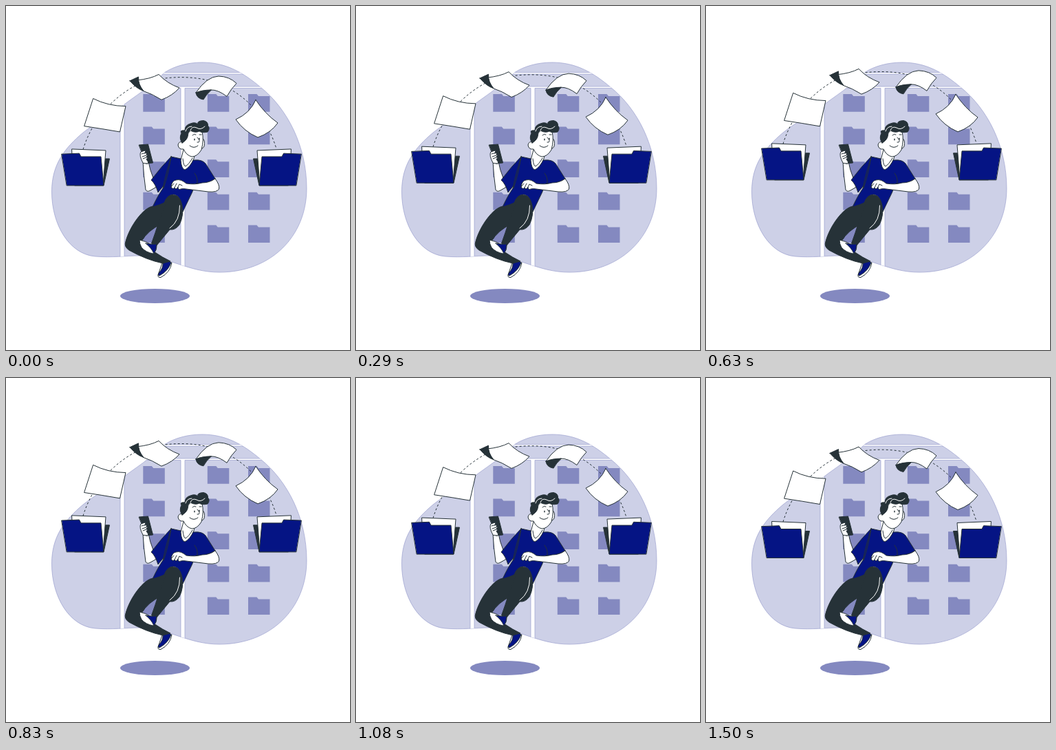
Write an HTML page that moves like this. It is 500 by 500 pixels and loops after 1540 ms.

```html
<!DOCTYPE html>
<html lang="en">
<head>
<meta charset="utf-8">
<title>File transfer</title>
<style>
  html, body { margin: 0; height: 100%; overflow: hidden; background: #fff; }
  svg { display: block; width: 100vw; height: 100vh; }
  .ink { stroke: #263238; stroke-width: 1; stroke-linejoin: round; stroke-linecap: round; }
  .blue { fill: #051484; }
  .dark { fill: #263238; }
  .white { fill: #fff; }
  .line { fill: none; }
  .shine { fill: none; stroke: #fff; stroke-width: 1; stroke-linecap: round; }
  .mid { fill: #8489c0; }
  .edge { stroke: #9da1cf; stroke-width: .7; }
</style>
</head>
<body>
<svg viewBox="0 0 500 500">
  <defs>
    <path id="blob" d="M285 82C320 82 345 97 370 118C410 150 437 205 437 265C437 335 385 387 310 387C265 387 237 364 195 363C172 363 155 366 130 364C92 361 66.500 318 66.500 270C66.500 230 85 207 112 184C132 168 155 157 172 143C186 132 208 119 230 97C245 87 265 82 285 82Z"/>
    <clipPath id="inside"><use href="#blob"/></clipPath>
    <path id="icon" d="M0 0H12.500L15 3H31.500V25.700H0Z"/>
    <g id="folder" class="ink">
      <path class="dark" d="M138 222.500H150.500L142 261.500H100Z"/>
      <path class="white" d="M96 208.500L145 210.500L141.500 256H98Z"/>
      <path class="blue" d="M81 215.700L106.500 214.700L109 219.500H138L142 261.500H88.500Z"/>
    </g>
  </defs>

  <!-- cabinet -->
  <use href="#blob" class="edge" fill="#cdd0e7"/>
  <g class="white edge" clip-path="url(#inside)">
    <path d="M166 130H172V380H166ZM200 96.500H360V99H200ZM180 117H390V119.500H260V400H254V119.500H180Z"/>
  </g>
  <g id="icons" class="mid"></g>
  <ellipse class="mid" cx="216.500" cy="421.500" rx="50.500" ry="10.500"/>

  <!-- flying files -->
  <g id="files">
    <path class="ink line" stroke-dasharray="3 3" style="stroke-linecap:butt" d="M112 209C124 170 150 138 185 118C215 103 270 99 305 112C350 128 380 165 393 208"/>
    <use href="#folder"/>
    <use href="#folder" transform="matrix(-1 0 0 1 510 0)"/>
    <g class="ink white">
      <path d="M127 135.200Q148 146 174 146.200L165.500 183.500Q140 179 114 175.200Z"/>
      <path d="M190 108.500Q210 106.500 222 100Q234 113 252 119.500Q242 131 226 136.800Q212 128 199.500 124Z"/>
      <path class="dark" d="M180 109.300L192.500 103.500Q192 115 200 124Q190 121 180 109.300Z"/>
      <path d="M276 126.500Q292 103 309 102.500Q325 103 335 113Q327 121 321 132Q308 122 298 122.500Z"/>
      <path class="dark" d="M276 126.500Q285 122.500 298.500 122.500Q291 129 287 136.500Q277 135 276 126.500Z"/>
      <path d="M363 137Q376 157 395 170.500Q385 185 366 191.500Q346 183 334 165.500Q355 156 363 137Z"/>
    </g>
  </g>

  <!-- person -->
  <g class="ink">
    <!-- supporting leg -->
    <path class="white" d="M228 372L241 373Q239 387 225 394.500Q220 395 221 391Z"/>
    <path class="blue" d="M228 372Q235 369 240 373Q236 385 223 392Q220 392 222 388Q229 381 228 372Z"/>
    <path class="dark" d="M214 291C200 292 180 320 174 342Q171 350 179 355Q204 369 228 374L239 371Q216 360 197 342Q206 326 226 317Q246 303 254 286Q250 271 236 276Q226 288 214 291Z"/>
    <!-- crossed leg -->
    <path class="dark" d="M236 277Q252 271 256 287Q259 304 252 318Q246 326 238 325Q228 337 219 348L211.500 345Q217 330 222 314Z"/>
    <path class="white" d="M194 340Q204 342 209 346L219 347Q219 356 214 360Q203 358 197 351Q194 346 194 340Z"/>
    <path class="blue" d="M203 345Q212 347 219 346Q219 355 215 360Q211 351 203 345Z"/>
    <path class="shine" d="M252.500 290Q253 312 238 323"/>

    <!-- raised arm -->
    <path class="white" d="M199 226Q200 246 203 267Q205 271 210 268L222 261L214 250Q209 238 207 226Z"/>
    <path class="dark" d="M193.500 202L206.500 201L213.500 228L204 229Z"/>
    <path class="white" d="M199 228Q193 217 196 212L202 210Q204 212 201 214Q206 213 204 216Q207 217 204 219Q207 221 204 223Q208 227 206 229Z"/>
    <path class="line" d="M201 214L197 215M204 217L198 219M204 220L199 222"/>

    <!-- shirt -->
    <path class="blue" d="M240 219Q226 233 211 253Q217 258 221 271L234 255Z"/>
    <path class="blue" d="M240 219L254 222L274 224Q285 223 290 229L304 251Q290 260 276 258L270 272L257 299Q256 276 244 274Q234 274 230 286Q224 289 213 292Q221 275 228 265Q232 245 240 219Z"/>
    <path class="line" d="M240 219Q236 244 229 265M274 243Q279 249 278 257"/>

    <!-- folded arm -->
    <path class="white" d="M304 251Q311 260 309.500 266Q307 271 294 270L262 266Q257 265 254 266Q250 268 250 263Q247 268 245 264Q242 267 240 263Q241 254 247 253Q254 251 262 258Q275 260 285 257Q296 257 304 251Z"/>
    <path class="line" d="M240 263L244 258M245 264L248 258M250 263L252 259L256 261"/>

    <!-- neck and head -->
    <path class="white" d="M258 209L254 224Q255 237 260 238Q267 235 273 222L274 217Z"/>
    <path class="line" d="M257 222Q258 233 261 233Q266 230 271 221"/>
    <path class="white" d="M285 192Q290 194 288 204Q286 208 284 207Z"/>
    <path class="white" d="M263 180Q276 175 285 183Q288 194 284 209Q278 219 270 219Q262 217 258 208Q251 209 250 202Q251 196 257 198Z"/>
    <path class="dark" d="M256 199Q251 192 255 185Q252 180 260 181Q260 173 268 171Q275 168 279 172Q277 167 287 166.500Q294 168 293.500 174Q297 178 293 183Q285 185 281 182Q275 185 268 181Q264 184 264 190Q262 196 256 199Z"/>
    <path class="shine" d="M261 182Q263 175 270 175M268 181Q270 174 277 177Q283 181 289 175"/>
    <path class="line" d="M278 191Q283 196 280 198L278 198M267 203Q273 208 279 203M271 188Q273 185 276 187M281 187L284 187"/>
    <ellipse class="dark" stroke="none" cx="274" cy="194" rx=".8" ry="1.500"/>
    <ellipse class="dark" stroke="none" cx="281" cy="193" rx=".8" ry="1.500"/>
  </g>
</svg>
<script>
  const LOOP = 1540, STEPS = 37, LIFT = 10;
  const files = document.getElementById('files');

  let icons = '';
  for (const x of [199.3, 292.8, 352])
    for (let row = 0; row < 5; row++)
      icons += `<use href="#icon" x="${x}" y="${128 + row * 47.6}"/>`;
  document.getElementById('icons').innerHTML = icons;

  // Linear rise and fall, stepped at 24 pictures a second
  function draw() {
    const time = performance.now() % LOOP;
    const step = Math.min(STEPS - 1, Math.floor((time + 5) * 24 / 1000));
    const phase = (step + 1) / STEPS;
    const lift = LIFT * (1 - Math.abs(1 - 2 * phase));
    files.setAttribute('transform', `translate(0 ${-lift})`);
    requestAnimationFrame(draw);
  }
  draw();
</script>
</body>
</html>
```
